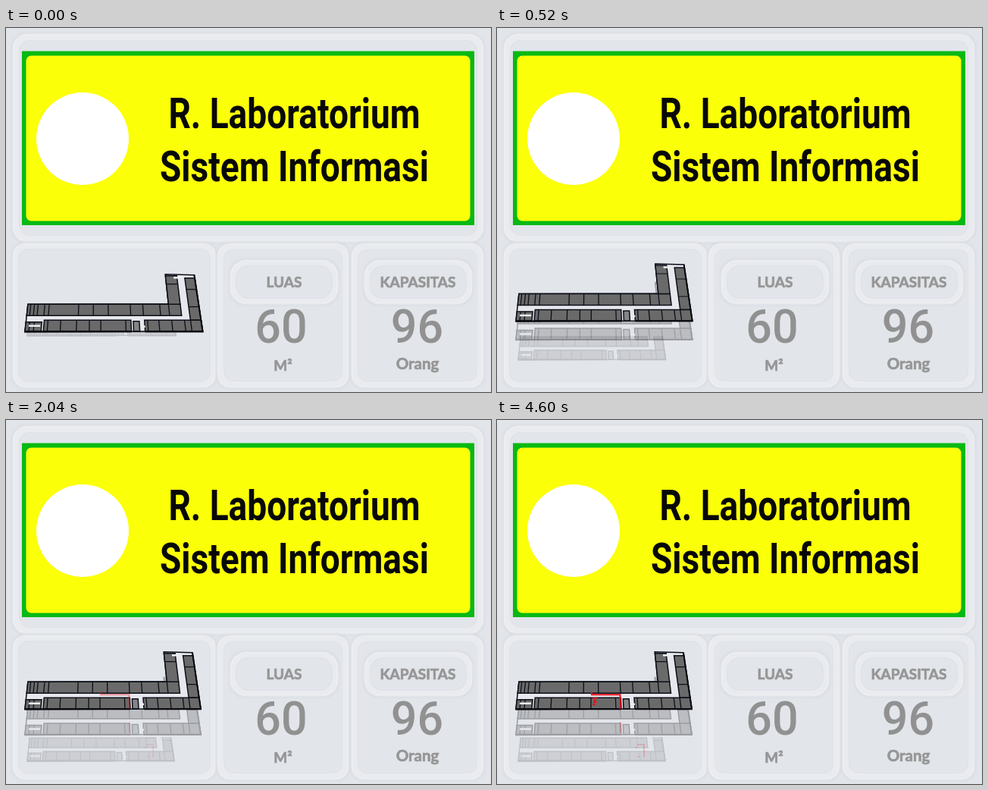
Animation, 640 px wide and 480 px high, one loop 5.12 s. Source, as an HTML page:

```html
<!DOCTYPE html>
<html lang="id">
<head>
<meta charset="utf-8">
<title>R. Laboratorium Sistem Informasi</title>
<style>
  html, body { margin: 0; width: 100%; height: 100%; overflow: hidden; background: #e2e5ea; }
  svg { display: block; width: 100vw; height: 100vh; }
  text { text-anchor: middle; }
  .title { font: 700 56px Roboto, sans-serif; fill: #080808; }
  .value { font: 500 61px Roboto, sans-serif; fill: #919191; }
  .label { font: 700 19px Lato, sans-serif; fill: #969696; stroke: #969696; stroke-width: .7; }
</style>
</head>
<body>
<svg viewBox="0 0 640 480" preserveAspectRatio="none">
  <defs>
    <filter id="soft" x="-20%" y="-20%" width="140%" height="140%"><feGaussianBlur stdDeviation="1.6"/></filter>
    <clipPath id="rows"><rect x="0" y="344" width="300" height="60"/></clipPath>
    <g id="floor"></g>
  </defs>
  <rect width="640" height="480" fill="#e2e5ea"/>
  <g id="panels"></g>

  <rect x="21" y="30.500" width="597" height="229.500" fill="#08b914"/>
  <rect x="26.500" y="36.500" width="586" height="218" rx="7" fill="#fbff08"/>
  <circle cx="101" cy="146" r="61" fill="#fff"/>
  <text class="title" transform="translate(380.500 131.500) scale(.822 1)">R. Laboratorium</text>
  <text class="title" transform="translate(380.500 201.500) scale(.822 1)">Sistem Informasi</text>

  <text class="label" x="367" y="342">LUAS</text>
  <text class="label" x="543.500" y="342">KAPASITAS</text>
  <text class="value" x="363" y="414.500">60</text>
  <text class="value" x="542.500" y="414.500">96</text>
  <text class="label" x="365.500" y="451.500">M²</text>
  <text class="label" x="543" y="450" style="font-size:20.5px">Orang</text>

  <g id="low">
    <g opacity=".17" transform="translate(28 450) scale(.836) translate(-25 -382)">
      <use href="#floor" clip-path="url(#rows)"/>
    </g>
    <path class="route" d="M185 428H194V445M184 431V433M185 444H188" fill="none" stroke="#e33" stroke-width="1.200" data-max=".4"/>
  </g>
  <g id="mid">
    <use href="#floor" opacity=".32"/>
    <path class="route" d="M162.500 365V379" stroke="#e33" stroke-width="1.500" data-max=".45"/>
  </g>
  <g id="top">
    <use href="#floor"/>
    <path class="route" d="M125 359V362.500H162.500V381" fill="none" stroke="#e8101c" stroke-width="2" data-max="1"/>
    <path id="marker" d="M126 367.500L131 367L128 371L132 373M130 369L127 375.500L130 376" fill="none" stroke="#e8101c" stroke-width="1.500"/>
  </g>
</svg>
<script>
const LOOP = 5120;
const $ = id => document.getElementById(id);
const clamp = v => Math.max(0, Math.min(1, v));
const ramp = (t, a, b) => clamp((t - a) / (b - a));

function add(parent, tag, attrs) {
  const el = document.createElementNS('http://www.w3.org/2000/svg', tag);
  for (const k in attrs) el.setAttribute(k, attrs[k]);
  parent.appendChild(el);
}

// Raised rounded frame: soft shade, pale rim, fine edge
function panel(x, y, w, h, rx, rim) {
  const g = $('panels');
  const frame = (d, stroke, width, more) => add(g, 'rect', {
    x: x + d, y: y + d, width: w - 2 * d, height: h - 2 * d, rx: rx - d / 2,
    fill: 'none', stroke, 'stroke-width': width, ...more
  });
  frame(-1, '#d6d9df', 2, { filter: 'url(#soft)' });
  frame(rim / 2, '#e9ebef', rim, { filter: 'url(#soft)' });
  frame(rim, '#d8dbe1', 1, { opacity: .7 });
  frame(1, '#eff1f4', 1.2);
}

panel(9, 8, 621, 274, 18, 9);
panel(9, 284, 268, 190, 16, 8);
panel(279, 284, 173, 190, 16, 9);
panel(456, 284, 174, 190, 16, 9);
panel(296, 306, 142, 58, 20, 8);
panel(473, 306, 142, 58, 20, 8);

// Plan point: x is measured on the front edge, walls lean away from the viewer
function pt(x, y) {
  const lean = -.11 + .26 * (x - 25) / 232;
  return (x - (381 - y) * lean).toFixed(1) + ' ' + y;
}

const floor = $('floor');
const EDGE = '#0c0e18';
const poly = points => 'M' + points.map(p => pt(...p)).join('L') + 'Z';

function block(x0, x1, y0, y1, fill = '#6a6a6a') {
  add(floor, 'path', {
    d: poly([[x0, y0], [x1, y0], [x1, y1], [x0, y1]]),
    fill, stroke: EDGE, 'stroke-width': 1.5
  });
}

function walls(xs, y0, y1) {
  add(floor, 'path', {
    d: xs.map(x => 'M' + pt(x, y0) + 'L' + pt(x, y1)).join(''),
    stroke: EDGE, 'stroke-width': 1.3
  });
}

const outline = [[25, 345.5], [216, 345], [216, 306], [257, 307], [257, 381], [25, 382]];
add(floor, 'path', { d: poly(outline), fill: '#e6e8ed', stroke: EDGE, 'stroke-width': 1.5 });
block(25, 232, 345.5, 360.5);
block(216, 232, 308, 345.5);
block(243, 257, 311, 366.5);
block(25, 46, 369, 381);
block(49, 164, 366.5, 381);
block(167, 175, 368, 381, '#858585');
block(182, 257, 366.5, 381);
walls([29, 34, 39, 48, 54, 94, 114, 134, 164, 181, 204, 216], 345.5, 360.5);
walls([54, 71, 92, 109, 124, 157, 186, 201, 218, 235, 243], 366.5, 381);
walls([30, 36], 369, 381);
add(floor, 'path', {
  d: `M${pt(216, 319)}L${pt(232, 319)}M${pt(243, 326)}L${pt(257, 326)}M${pt(243, 349)}L${pt(257, 349)}`,
  stroke: EDGE, 'stroke-width': 1.2
});
// Open spaces and front edge
add(floor, 'path', { d: 'M30 374H45M177 375H182M219 310.500H230', stroke: '#eceef2', 'stroke-width': 2.5 });
add(floor, 'path', { d: 'M25 381.500H164M182 381.500H257L246 307', fill: 'none', stroke: '#08090d', 'stroke-width': 2 });

const routes = document.querySelectorAll('.route');

function draw(t) {
  const p = ramp(t, 0, 720);
  const widen = 1 + .011 * (1 - p);
  const place = (id, y) => $(id).setAttribute('transform', `translate(25 ${y}) scale(${widen} 1) translate(-25 0)`);
  place('top', 19 * (1 - p) - .3);
  place('mid', 19.5 + 14 * p);
  place('low', -44 * (1 - p));

  const shown = ramp(t, 1680, 2520);
  routes.forEach(r => r.setAttribute('opacity', r.dataset.max * shown));

  const blink = ramp(t, 2240, 2520) - ramp(t, 2920, 3160)
    + ramp(t, 3520, 3600) - ramp(t, 4040, 4120) + ramp(t, 4520, 4600);
  $('marker').setAttribute('opacity', clamp(blink));
}

const start = performance.now();
function tick() {
  // The picture advances in steps of 40 ms
  const t = (performance.now() - start) % LOOP;
  draw(Math.floor(t / 40) * 40);
  requestAnimationFrame(tick);
}
draw(0);
requestAnimationFrame(tick);
</script>
</body>
</html>
```
